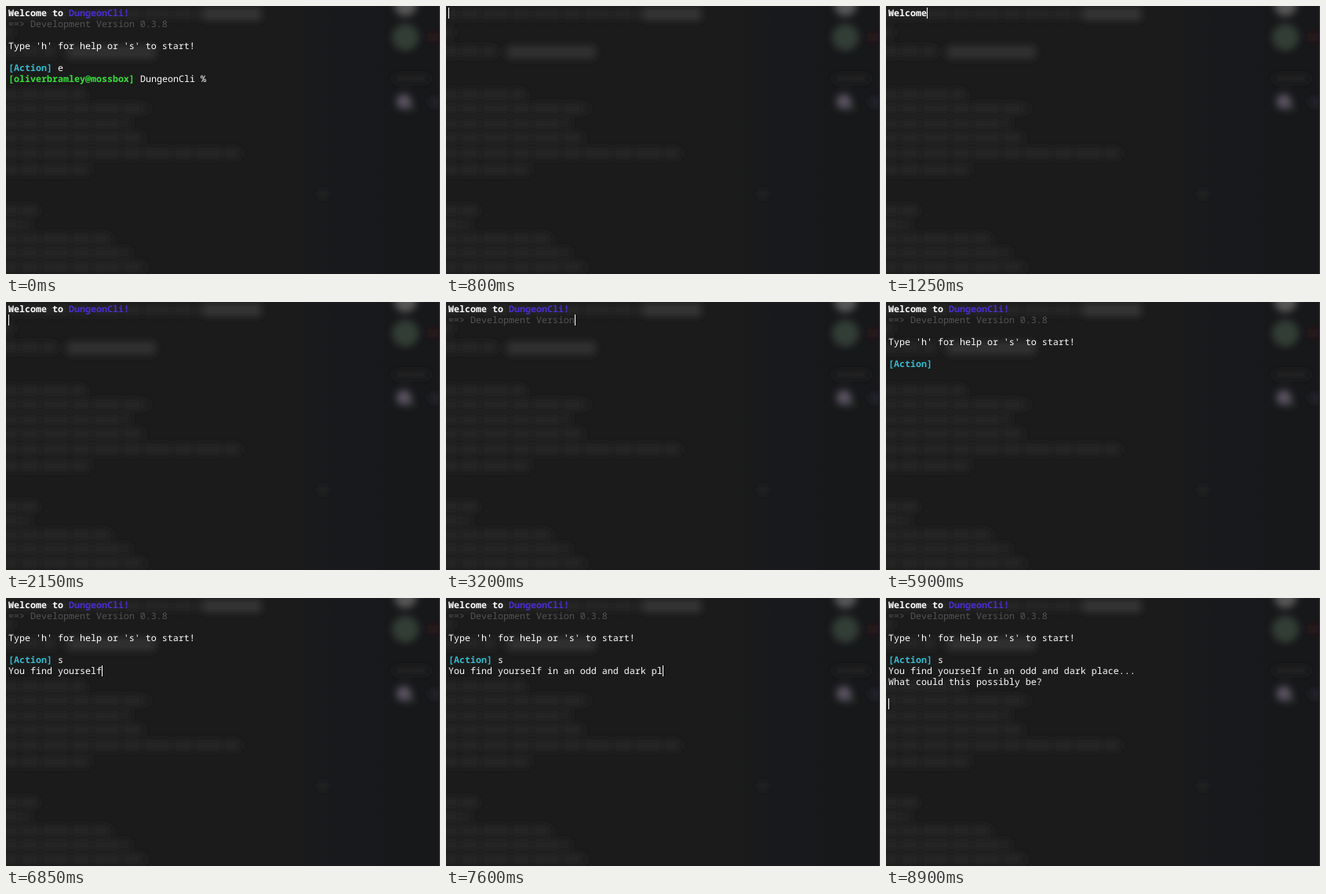
Animation of 553x342 px, one loop 9.15 s. Source, as an HTML page:

```html
<!DOCTYPE html>
<html lang="en">
<head>
<meta charset="utf-8">
<title>DungeonCli terminal</title>
<style>
  html, body { margin: 0; width: 100%; height: 100%; overflow: hidden; background: #1b1b1b; }
  svg { position: absolute; left: 0; top: 0; display: block; }
  text {
    font: 500 11.6667px "Noto Sans Mono", "DejaVu Sans Mono", monospace;
    font-variant-ligatures: none;
    text-rendering: geometricPrecision;
    white-space: pre;
    fill: #fff;
  }
  .bold { font-weight: 700; }
  .title { font-weight: 700; fill: #4b2dd2; }
  .dim { font-weight: 400; fill: #555; }
  .action { font-weight: 700; fill: #36b9cd; }
  .prompt { font-weight: 700; fill: #35e03a; }
</style>
</head>
<body>
<svg width="553" height="342" viewBox="0 0 553 342">
  <defs>
    <linearGradient id="panel">
      <stop offset=".68" stop-color="#1b1b1b"/>
      <stop offset=".7" stop-color="#191a1b"/>
      <stop offset=".74" stop-color="#191a1b"/>
      <stop offset=".76" stop-color="#17191d"/>
      <stop offset=".83" stop-color="#17191d"/>
      <stop offset=".87" stop-color="#17181a"/>
    </linearGradient>
    <filter id="soft" filterUnits="userSpaceOnUse" x="-30" y="-30" width="613" height="402">
      <feGaussianBlur stdDeviation="5"/>
    </filter>
  </defs>
  <rect width="553" height="342" fill="url(#panel)"/>
  <g filter="url(#soft)">
    <g id="blurred" stroke="#282828" stroke-width="11" stroke-dasharray="36 2 25 2"></g>
    <rect x="251" y="2" width="74" height="16" fill="#353535"/>
    <rect x="78" y="51" width="112" height="16" fill="#313131"/>
    <circle cx="404" cy="240" r="5" fill="#28282a"/>
    <circle cx="509" cy="-1" r="14" fill="#565656"/>
    <circle cx="509" cy="40" r="17" fill="#333c34"/>
    <circle cx="507" cy="122" r="10" fill="#56515f"/>
    <circle cx="518" cy="131" r="4" fill="#1c3324"/>
    <rect x="495" y="88" width="43" height="9" fill="#202024"/>
    <rect x="540" y="35" width="8" height="10" fill="#3c1823"/>
    <rect x="541" y="117" width="12" height="11" fill="#27272e"/>
  </g>
  <path d="M552.5 0V342" stroke="#0d5a1c"/>
  <g id="screen"></g>
  <rect id="cursor" width="1" height="14" fill="#fff"/>
</svg>
<script>
const LOOP = 9150, STEP = 50, CLEAR = 500;
const LEFT = 3, TOP = 2, CELL = 7, LINE = 14, BASE = 11;

// row, column, text, style, start, end, kept from the previous session
const runs = [
  [0, 0, "", "", CLEAR, CLEAR],
  [0, 0, "Welcome to ", "bold", 1000, 1400, true],
  [0, 11, "DungeonCli!", "title", 1650, 2000, true],
  [1, 0, "", "", 2150, 2150],
  [1, 0, "==> Development Version 0.3.8 ", "dim", 2450, 3400, true],
  [2, 0, "", "", 3450, 3450],
  [3, 0, "Type 'h' for help or 's' to start! ", "", 3650, 4950, true],
  [4, 0, "", "", 5000, 5000],
  [5, 0, "[Action] ", "action", 5050, 5050, true],
  [5, 9, "s", "", 6150, 6150],
  [6, 0, "You find yourself in an odd and dark place...", "", 6300, 7800],
  [7, 0, "", "", 7850, 7850],
  [7, 0, "What could this possibly be?", "", 7950, 8800],
  [8, 0, "", "", 8850, 8850],
  [9, 0, "", "", 8900, 8900],
  [5, 9, "e", "", LOOP, LOOP, true],
  [6, 0, "[oliverbramley@mossbox]", "prompt", LOOP, LOOP, true],
  [6, 24, "DungeonCli % ", "", LOOP, LOOP, true]
].map(([row, col, text, style, start, end, old]) => {
  const node = add("screen", "text", {
    x: LEFT + col * CELL, y: TOP + row * LINE + BASE, class: style
  });
  return { row, col, text, start, end, old, node };
});

function add(parent, tag, attrs) {
  const node = document.createElementNS("http://www.w3.org/2000/svg", tag);
  for (const key in attrs) node.setAttribute(key, attrs[key]);
  return document.getElementById(parent).appendChild(node);
}

// Blurred text behind the window: y and right end of each line
[[10, 250], [34, 9], [58, 64], [113, 101], [131, 180], [150, 158], [168, 176], [188, 298],
 [209, 106], [261, 40], [279, 31], [297, 133], [315, 158], [333, 177]]
  .forEach(([y, end]) => add("blurred", "path", { d: `M-20 ${y}H${end}` }));

function typed(run, t) {
  if (t < CLEAR) return run.old ? run.text.length : 0;
  if (t < run.start || !run.text) return 0;
  if (t >= run.end) return run.text.length;
  return Math.floor(1 + (run.text.length - 1) * (t - run.start) / (run.end - run.start));
}

const cursor = document.getElementById("cursor");

function draw(time) {
  const t = Math.floor(time % LOOP / STEP) * STEP;
  let row = 6, col = 37;
  for (const run of runs) {
    const count = typed(run, t);
    const shown = run.text.slice(0, count);
    if (run.node.textContent !== shown) run.node.textContent = shown;
    if (t >= run.start) {
      row = run.row;
      col = run.col + count;
    }
  }
  const hidden = t < STEP || (t >= 5700 && t < 6150);
  cursor.setAttribute("visibility", hidden ? "hidden" : "visible");
  cursor.setAttribute("x", LEFT + col * CELL);
  cursor.setAttribute("y", TOP + row * LINE);
}

const begin = performance.now();
function tick() {
  draw(performance.now() - begin);
  requestAnimationFrame(tick);
}
tick();
</script>
</body>
</html>
```
